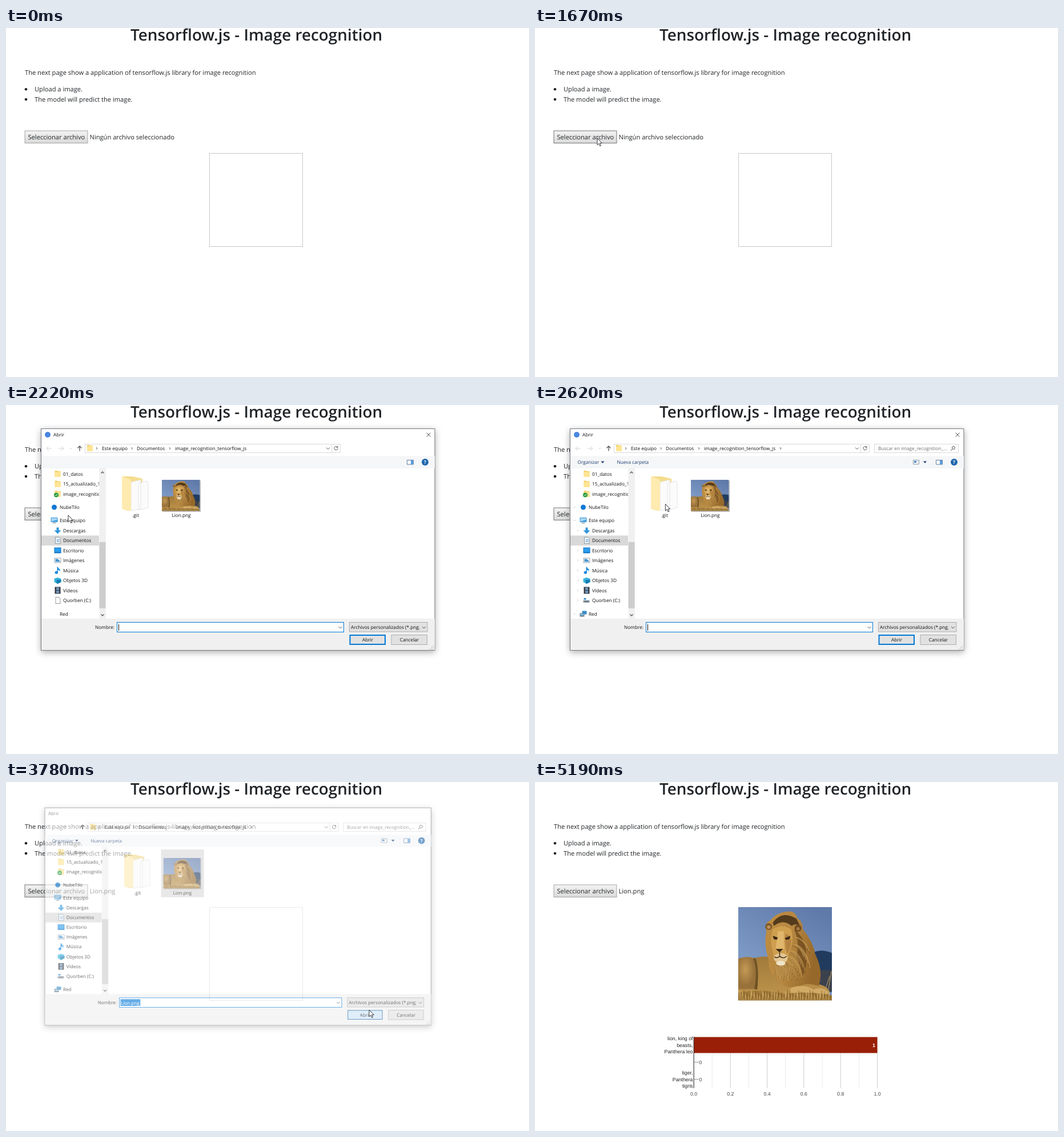
An HTML page for the animation above (5960 ms loop, 916x611 px).

```html
<!DOCTYPE html>
<html lang="en">
<head>
<meta charset="utf-8">
<title>Image recognition demo</title>
<style>
html, body { margin: 0; width: 100%; height: 100%; overflow: hidden; background: #fff; }
svg { display: block; width: 100vw; height: 100vh; }
text { font: 11.13px "Open Sans", "Noto Sans", sans-serif; fill: #212529; text-rendering: geometricPrecision; white-space: pre; }
.title { font-size: 27.85px; font-weight: 600; }
#dialog { transform-origin: 406px 235.5px; }
#dialog text { font-size: 8.25px; fill: #111; }
#dialog .tool { fill: #1b3c74; }
#dialog .hint { fill: #6d6d6d; }
.mid { text-anchor: middle; }
.end { text-anchor: end; }
.line { fill: none; stroke: #555; }
.pale { stroke: #d2d2d2; }
#chart text { font: 8.8px "Liberation Sans", Arial, sans-serif; fill: #222; }
#chart .tick { fill: #444; text-anchor: middle; }
.frame { fill: #fff; stroke: #d9d9d9; }
.push { fill: #e1e1e1; stroke: #adadad; }
.hot { fill: #e5f1fb; stroke: #0078d7; }
.down { fill: #cce4f7; stroke: #005499; }
#window { filter: drop-shadow(0 3px 6px rgba(0, 0, 0, .32)); }
</style>
</head>
<body>
<svg id="stage" viewBox="0 0 916 611">
<defs>
  <linearGradient id="face" x2="0" y2="1"><stop stop-color="#f3f3f3"/><stop offset="1" stop-color="#dadada"/></linearGradient>
  <linearGradient id="pressed" x2="0" y2="1"><stop stop-color="#d6d6d6"/><stop offset="1" stop-color="#ececec"/></linearGradient>
  <linearGradient id="sky" x1=".8" x2=".2" y2="1"><stop stop-color="#5f7aa9"/><stop offset=".7" stop-color="#7c98c4"/></linearGradient>
  <linearGradient id="mane" x2="1" y2=".3"><stop stop-color="#bf8d40"/><stop offset=".5" stop-color="#b78841"/><stop offset="1" stop-color="#96692b"/></linearGradient>
  <linearGradient id="body" x2="0" y2="1"><stop stop-color="#a17a3a"/><stop offset="1" stop-color="#c1964d"/></linearGradient>
  <radialGradient id="haunch" cx=".4" cy=".4"><stop stop-color="#c49a55"/><stop offset="1" stop-color="#98713a"/></radialGradient>
  <clipPath id="navClip"><path d="M62 111H163.500V374H62Z"/></clipPath>
  <clipPath id="filterClip"><path d="M602 381H724V398H602Z"/></clipPath>
  <symbol id="lion" viewBox="0 0 163 163" preserveAspectRatio="none">
    <path fill="url(#sky)" d="M0 0H163V163H0Z"/>
    <path fill="#213b5f" d="M128 80Q145 72 163 80V114H125Z"/>
    <path fill="#3b414d" d="M120 110H163V148H120Z"/>
    <path fill="url(#body)" d="M0 91Q14 84 28 89Q45 84 58 88L92 120L142 135Q160 140 158 152L140 163H0Z"/>
    <path fill="url(#haunch)" d="M0 90Q16 84 26 92Q34 108 29 143H0Z"/>
    <path fill="#6f5124" d="M26 90Q34 108 28 143L33 144Q37 108 30 89Z"/>
    <path fill="url(#mane)" d="M49 43Q45 27 55 24Q66 10 84 8Q99 5 103 20Q113 25 112 38Q130 60 134 82Q149 112 140 138Q118 130 104 140Q80 143 68 126Q52 116 53 92Q44 66 49 43Z"/>
    <path fill="#7c5423" d="M97 38Q120 58 118 84Q121 104 112 120Q109 100 101 87Q108 62 97 38Z"/>
    <path id="dark" fill="none" stroke="#6b4a20" stroke-opacity=".45" stroke-width="1.400"/>
    <path id="light" fill="none" stroke="#dfb468" stroke-opacity=".5" stroke-width="1.400"/>
    <path fill="#543b1c" d="M60 27Q76 5 101 20L107 32Q98 28 93 33Q78 20 62 33Z"/>
    <circle cx="53" cy="34" r="6" fill="#80592a"/><circle cx="53" cy="35" r="3" fill="#c0925a"/>
    <circle cx="104" cy="37" r="6" fill="#6e4a22"/><circle cx="104" cy="38" r="3" fill="#a87a42"/>
    <path fill="#cf9f50" d="M60 39Q75 28 92 39Q98 60 88 80Q86 100 74 102Q62 99 60 78Q54 56 60 39Z"/>
    <path fill="#b58341" d="M82 46Q94 50 92 64Q90 76 85 82Q80 64 82 46Z"/>
    <path fill="#e0b66c" d="M69 42H79L80 73H65Z"/>
    <ellipse cx="74" cy="89" rx="12" ry="8.500" fill="#e3c794"/>
    <ellipse cx="74" cy="98" rx="8" ry="4" fill="#f0e3c8"/>
    <path fill="#3a2615" d="M65 73H78L72 79ZM60 50L69 53L67 57L62 56ZM81 54L91 50L89 56L83 57Z"/>
    <path fill="none" stroke="#4b321b" stroke-width="1.600" d="M72 79V86Q67 90 63 87M72 86Q79 91 84 86"/>
    <path fill="#d1aa66" d="M91 141Q114 133 131 144Q148 137 158 150L145 158H88Z"/>
    <path fill="#a27a3a" d="M0 149Q40 142 82 151Q124 146 163 154V163H0Z"/>
    <path id="grass" fill="none" stroke="#d2b06c"/>
    <path id="shade" fill="none" stroke="#75551f" stroke-opacity=".7"/>
    <path fill="none" stroke="#c2a36b" d="M156 150L162 112M148 154L159 121"/>
  </symbol>
  <g id="folder"><path fill="#f3cd62" d="M0 0H4L5 1H10V11H0Z"/><path fill="#ffe594" d="M1.5 2H10V11H0V3Z"/></g>
</defs>

<text class="title" x="218" y="22">Tensorflow.js - Image recognition</text>
<text x="33" y="81.6">The next page show a application of tensorflow.js library for image recognition</text>
<circle cx="35" cy="107.3" r="2.3" fill="#212529"/><circle cx="35" cy="125" r="2.3" fill="#212529"/>
<text x="50" y="111">Upload a image.</text>
<text x="50" y="128.6">The model will predict the image.</text>
<rect id="choose" x="33" y="180" width="110" height="21.5" fill="url(#face)" stroke="#a6a6a6"/>
<text x="38.5" y="195">Seleccionar archivo</text>
<text id="picked" x="146.5" y="195"></text>
<rect id="empty" x="356.5" y="219.5" width="163" height="163" fill="#fff" stroke="#c8c8c8"/>
<use id="photo" href="#lion" x="356" y="219" width="164" height="163.5"/>

<g id="chart"></g>

<g id="dialog">
  <rect id="window" x="61.5" y="41.5" width="689.5" height="388" fill="#fff" stroke="#767b82"/>
  <path fill="#f5f6f7" d="M62 89.5H751V111H62Z"/>
  <path fill="#f0f0f0" d="M62 374H751V429H62Z"/>
  <circle id="badge" cx="73" cy="52" r="5" fill="#4a86e0"/>
  <text id="caption" x="83" y="55">Abrir</text>
  <path id="close" class="line" d="M736.5 48.5l7 7m0 -7l-7 7"/>
  <path class="line pale" d="M80 76H71m4-4l-4 4 4 4M92 76h9m-4-4l4 4-4 4M111.500 75l2 2 2-2"/>
  <path class="line" stroke-width="1.3" d="M129 80.500V72m-3.500 3.500l3.500-3.500 3.500 3.500"/>
  <path class="frame" d="M138.500 68.500H585.500V83.500H138.500ZM570.500 68.500V83.500"/>
  <use href="#folder" x="142" y="70"/>
  <path class="line" d="M158 74l2 2-2 2M219.500 74l2 2-2 2M286 74l2 2-2 2M561 74.500l3 3 3-3M580.500 73.500a3.200 3.200 0 1 0 .8 2.500M581 72v2.500h-2.500"/>
  <text x="168" y="79">Este equipo</text><text x="229" y="79">Documentos</text>
  <text x="296" y="79">image_recognition_tensorflow_js</text>
  <g id="search">
    <path class="line" d="M429 74l2 2-2 2"/>
    <rect class="frame" x="594.5" y="68.500" width="147" height="15"/>
    <text class="hint" x="601" y="79">Buscar en image_recognition_...</text>
    <path class="line" d="M728 80l3-3"/><circle class="line" cx="733" cy="75" r="2.500"/>
  </g>
  <g id="tools">
    <text class="tool" x="74.500" y="103">Organizar</text><text class="tool" x="143.500" y="103">Nueva carpeta</text>
    <path fill="#1b3c74" d="M115.500 98.500h6l-3 3.500ZM680 98.500h6l-3 3.500Z"/>
    <path fill="#fff" stroke="#8a98a8" d="M662.500 96.500h10v7h-10Z"/><path fill="#3d7fc1" d="M664 98h4v3h-4Z"/>
  </g>
  <path fill="#fff" stroke="#5d7fa6" d="M702.500 96.500h11v7.500h-11Z"/><path fill="#5ba0e0" d="M709 97h4v7h-4Z"/>
  <circle cx="734" cy="100" r="6" fill="#1f67ad"/>
  <text class="mid" x="734" y="103" style="fill:#fff;font-weight:700">?</text>

  <g id="content">
    <path fill="#d9d9d9" d="M62 228.500H163V246H62Z"/>
    <g id="nav" clip-path="url(#navClip)"></g>
    <path fill="#f0f0f0" d="M163.500 111H175V374H163.500Z"/><path fill="#cdcdcd" d="M163.500 240H174.500V356H163.500Z"/>
    <path class="line" stroke-width="1.3" d="M166.500 119.500l2.500-2.500 2.500 2.500M166.500 366.500l2.500 2.500 2.500-2.500"/>
    <path fill="#f5dc8e" d="M203.500 125H222L239 129V180L214 185L203.500 182Z"/>
    <path fill="#fbfbfb" stroke="#e6e6e6" d="M219 135L236 131V182L219 185ZM232 137L247 133 249 138V180L232 184Z"/>
    <path fill="#ffebaf" d="M203.500 125L219 131V185L203.500 182Z"/>
    <text class="mid" x="227" y="196">.git</text>
    <rect id="pick" x="269.500" y="116.500" width="75.500" height="84"/>
    <path fill="#bbb" d="M274 132H341V187H274Z"/>
    <use href="#lion" x="273" y="131" width="66.500" height="54.500"/>
    <text class="mid" x="307" y="196">Lion.png</text>
  </g>

  <text x="156" y="392">Nombre:</text>
  <rect id="field" x="194.500" y="380.500" width="397" height="17" fill="#fff"/>
  <path id="marked" fill="#0078d7" d="M196.500 383H232V395H196.500Z"/>
  <text id="name" x="197" y="392.500">Lion.png</text>
  <path id="caret" stroke="#000" d="M197.500 384V395"/>
  <path class="line" d="M582.500 388l3 3 3-3"/>
  <rect id="filter" x="601.500" y="380.500" width="136.500" height="16.500"/>
  <g clip-path="url(#filterClip)"><text x="604" y="392">Archivos personalizados (*.png;*.jpg)</text></g>
  <path class="line" d="M729 388l3 3 3-3"/>
  <rect id="open" x="602.500" y="403" width="61.500" height="16"/>
  <text class="mid" x="633.500" y="414">Abrir</text>
  <rect class="push" x="675" y="402.500" width="62.500" height="17"/>
  <text class="mid" x="706.500" y="414">Cancelar</text>
  <path stroke="#b5b5b5" stroke-width="1.500" stroke-dasharray="1.500 1.500" d="M742 427.500h7M745 424.500h4M748 421.500h1"/>
</g>

<path id="cursor" d="M0 0V11.800L2.800 9.300L4.700 13.600L6.600 12.800L4.700 8.600H8.300Z" fill="#fff" stroke="#22222c" stroke-width=".9"/>
</svg>

<script>
const LOOP = 5960;
const el = Object.fromEntries([...document.querySelectorAll('[id]')].map(e => [e.id, e]));
const path = (fill, d) => `<path fill="${fill}" d="${d}"/>`;

// Tree icons, drawn in a 12 px box centred on the row.
const folder = '<use href="#folder" x="1" y="-5.500"/>';
const icons = {
  folder,
  synced: folder + '<circle cx="3.500" cy="2" r="4" fill="#2c9c3f"/><path class="line" style="stroke:#fff" d="M1.500 2l1.500 1.500 2.500-3"/>',
  cloud: '<circle cx="6" cy="0" r="4.500" fill="#0f78d4"/>',
  pc: path('#3c9ade', 'M0-5H12V3H0Z') + path('#a9d6f3', 'M1-4H11V-1L1 2Z') + path('#65717c', 'M3 4H9V5H3Z'),
  down: path('#2f95dc', 'M4-5H8V0H12L6 6L0 0H4Z'),
  doc: path('#8797a5', 'M1.500-6H8L11-3V6H1.500Z') + path('#fff', 'M2.500-5H8L10-3V5H2.500Z') + path('#609ccb', 'M4-2H9V-1H4ZM4 0H9V1H4ZM4 2H9V3H4Z'),
  desk: path('#0c73c4', 'M0-5H12V5H0Z') + path('#2c9ef0', 'M1-4H11V3H1Z'),
  pics: path('#9aa8b4', 'M0-4.500H12V4.500H0Z') + path('#fff', 'M1-3.500H11V3.500H1Z') + path('#4594cf', 'M2-2.500H6L10 1V2.500H2Z'),
  music: path('#1689e0', 'M5-6H6.500Q7-3 10-2V2L8.500 0 6.500-1V3A2.800 2.500 0 1 1 5 1.500Z'),
  cube: path('#37b3de', 'M0-3L6-5 12-3V3L6 6 0 3Z') + path('#177eb4', 'M4-1H12V3L6 6 4 5Z'),
  film: path('#343b46', 'M1-6H11V6H1Z') + path('#6e93b5', 'M3.500-5H8.500V-.5H3.500ZM3.500.5H8.500V5H3.500Z'),
  drive: path('#8b98a5', 'M0 0H11V4H0Z') + path('#4b5e70', 'M2 1H9V2H2Z') + path('#3d97d9', 'M1-4H5V-1H1Z'),
  net: path('#348dcc', 'M4-5H12V1H4Z') + path('#68767f', 'M0-1H8V5H0Z') + path('#7fc0e7', 'M1 0H7V3H1Z'),
  sheet: path('#999', 'M2-6H8L11-3V6H2Z') + path('#fff', 'M3-5H7.500L10-2.500V5H3Z')
};
const rows = [
  [120.500, 1, 'folder', '01_datos'], [138, 1, 'folder', '15_actualizado_12'],
  [155.500, 1, 'synced', 'image_recognition'], [179, 0, 'cloud', 'NubeTilo'],
  [202, 0, 'pc', 'Este equipo'], [219.500, 1, 'down', 'Descargas'],
  [237, 1, 'doc', 'Documentos'], [254.500, 1, 'desk', 'Escritorio'],
  [272, 1, 'pics', 'Imágenes'], [289.500, 1, 'music', 'Música'],
  [307, 1, 'cube', 'Objetos 3D'], [324.500, 1, 'film', 'Vídeos'],
  [342, 1, 'drive', 'Quorben (C:)'], [365.500, 0, 'net', 'Red']
];
el.nav.innerHTML = rows.map(([y, sub, icon, label]) => {
  const late = icon === 'drive' || icon === 'net';
  const x = sub ? 84.500 : 78.500;
  const arrow = y < 170 ? '' : icon === 'pc' ? 'M67 -1l2 2 2-2' : `M${sub ? 74 : 68} -2l2 2-2 2`;
  return `<g transform="translate(0 ${y})"><path class="line pale arrow" d="${arrow}"/>` +
    `<g class="${late ? 'late' : ''}" transform="translate(${x})">${icons[icon]}</g>` +
    (icon === 'drive' ? `<g class="early" transform="translate(${x})">${icons.sheet}</g>` : '') +
    `<text x="${sub ? 100 : 94}" y="3">${label}</text></g>`;
}).join('');

const strokes = (n, f) => Array.from({ length: n }, (_, i) => f(i)).join('');
const blades = shift => strokes(54, i =>
  `M${i * 3 + shift} 163l${((i + shift) * 7 % 5) - 2} ${-6 - (i + shift) * 11 % 13}`);
el.grass.setAttribute('d', blades(0));
el.shade.setAttribute('d', blades(1.500));

// Hair falls from around the face, down and outwards.
const hair = (n, shift) => strokes(n, i => {
  const u = (i + shift) / n, v = (i * 0.618 + shift) % 1;
  const x = 62 + 42 * u, y = 102 - 62 * u * u + 28 * v * u;
  return `M${x} ${y}q${4 + 12 * u} ${4 + 6 * v} ${2 + 20 * u} ${18 + 24 * u * v}`;
});
el.dark.setAttribute('d', hair(34, 0));
el.light.setAttribute('d', hair(34, .5));

function buildChart() {
  let s = '';
  for (let i = 0; i <= 10; i++) {
    const x = 278 + i * 32.150;
    s += `<path stroke="${i % 2 ? '#ebebeb' : '#ccc'}" d="M${x} 446V536"/>`;
    if (i % 2 === 0) s += `<text class="tick" x="${x}" y="548.500">${(i / 10).toFixed(1)}</text>`;
  }
  s += '<path fill="#991f07" d="M278 446.500H599.500V474.500H278Z"/><path stroke="#333" d="M278.200 446V536"/>';
  s += '<text class="mid" x="593.500" y="463.700" style="fill:#fff;font-weight:700">1</text>';
  for (const y of [490.500, 520.500])
    s += `<path stroke="#999" d="M279 ${y}H287"/><text class="mid" x="290" y="${y + 3}" style="fill:#444">0</text>`;
  [['lion, king of', 452], ['beasts,', 463.700], ['Panthera leo', 475.400],
   ['tiger,', 512], ['Panthera', 523.700], ['tigris', 535.400]]
    .forEach(([label, y]) => s += `<text class="end" x="276.500" y="${y}">${label}</text>`);
  el.chart.innerHTML = s;
}
buildChart();

// Pointer legs: start, end, number of screen refreshes, from, to, easing power.
// A negative power eases out, a positive one eases in.
const legs = [
  [290, 830, 8, [895, 601], [216, 169], -1.400],
  [910, 1290, 6, [216, 169], [109, 193], -1.500],
  [2540, 2770, 4, [109, 193], [310, 160], -1.300],
  [2930, 3080, 3, [310, 160], [665, 393], 1],
  [3150, 3150, 1, [665, 393], [656, 397], 1],
  [3230, 3390, 3, [656, 397], [636, 399], -1.300],
  [3930, 3930, 1, [636, 399], [632, 398.500], 1],
  [4330, 4480, 3, [632, 398.500], [635, 398.500], 1],
  [4860, 5190, 5, [635, 398.500], [915, 680], 1.400]
];
// Share of a stepped change done at time t; the first step lands on start.
const stepped = (t, a, b, n) =>
  t < a ? 0 : t >= b ? 1 : (1 + Math.floor((t - a + 3) / (b - a) * (n - 1))) / n;

function pointer(t) {
  const [a, b, n, from, to, pow] = legs.filter(l => t >= l[0]).pop() || legs[0];
  const k = stepped(t, a, b, n);
  const e = pow < 0 ? 1 - (1 - k) ** -pow : k ** pow;
  return from.map((v, i) => v + (to[i] - v) * e);
}

// Latest value of a [time, value] list.
const at = (t, list) => list.filter(p => t >= p[0]).pop()[1];
const show = (e, on) => { e.style.display = on ? '' : 'none'; };
const paint = (e, fill, stroke) => { e.setAttribute('fill', fill); e.setAttribute('stroke', stroke); };
const each = (sel, on) => document.querySelectorAll(sel).forEach(e => show(e, on));

function draw(t) {
  const [x, y] = pointer(t);
  show(el.cursor, t >= 290 && t < 5190);
  el.cursor.setAttribute('transform', `translate(${x} ${y})`);

  const over = t >= 290 && t < 1910 && x < 143 && y > 180;
  paint(el.choose, t >= 1440 && t < 1590 ? 'url(#pressed)' : 'url(#face)',
    over || (t >= 1910 && t < 3930) ? '#777' : '#a6a6a6');
  el.picked.textContent = t < 3780 ? 'Ningún archivo seleccionado' : 'Lion.png';
  show(el.empty, t < 3930);
  show(el.photo, t >= 3930);
  show(el.chart, t >= 4330);

  const [alpha, scale] = at(t, [[0, [0, 1]], [1910, [.3, .95]], [1990, [.8, .985]],
    [2070, [1, 1]], [3780, [.6, .981]], [3850, [.13, .95]], [3930, [0, 1]]]);
  show(el.dialog, alpha > 0);
  el.dialog.style.opacity = alpha;
  el.dialog.style.transform = `scale(${scale})`;

  show(el.content, t >= 2140);
  show(el.tools, t >= 2300);
  show(el.search, t >= 2370);
  each('.late', t >= 2450);
  each('.early', t < 2450);
  each('.arrow', t >= 2540 && t < 3390);

  const chosen = t >= 2850, pressed = t >= 3550;
  paint(el.pick, ...(pressed ? ['#d9d9d9', '#d9d9d9'] : chosen ? ['#cce8ff', '#99d1ff'] :
    t >= 2620 && x > 269 ? ['#e5f3ff', '#e5f3ff'] : ['none', 'none']));
  show(el.name, chosen);
  show(el.caret, t >= 2140 && !chosen);
  show(el.marked, pressed);
  el.name.style.fill = pressed ? '#fff' : '';
  el.field.setAttribute('stroke', chosen && !pressed ? '#7a7a7a' : '#0078d7');
  el.filter.setAttribute('class', t >= 3080 && t < 3230 ? 'hot' : 'push');
  el.open.setAttribute('class', pressed ? 'down' : t >= 3230 ? 'hot' : 'push');
  el.open.style.stroke = pressed ? '' : '#0078d7';
  el.open.style.strokeWidth = pressed ? 1 : 2;

  const closing = t >= 3710;
  el.caption.style.fill = closing ? '#555' : '';
  el.caption.setAttribute('x', closing ? 67.500 : 83);
  show(el.badge, !closing);
  show(el.close, !closing);
}

function tick() {
  draw(performance.now() % LOOP);
  requestAnimationFrame(tick);
}
tick();
</script>
</body>
</html>
```
